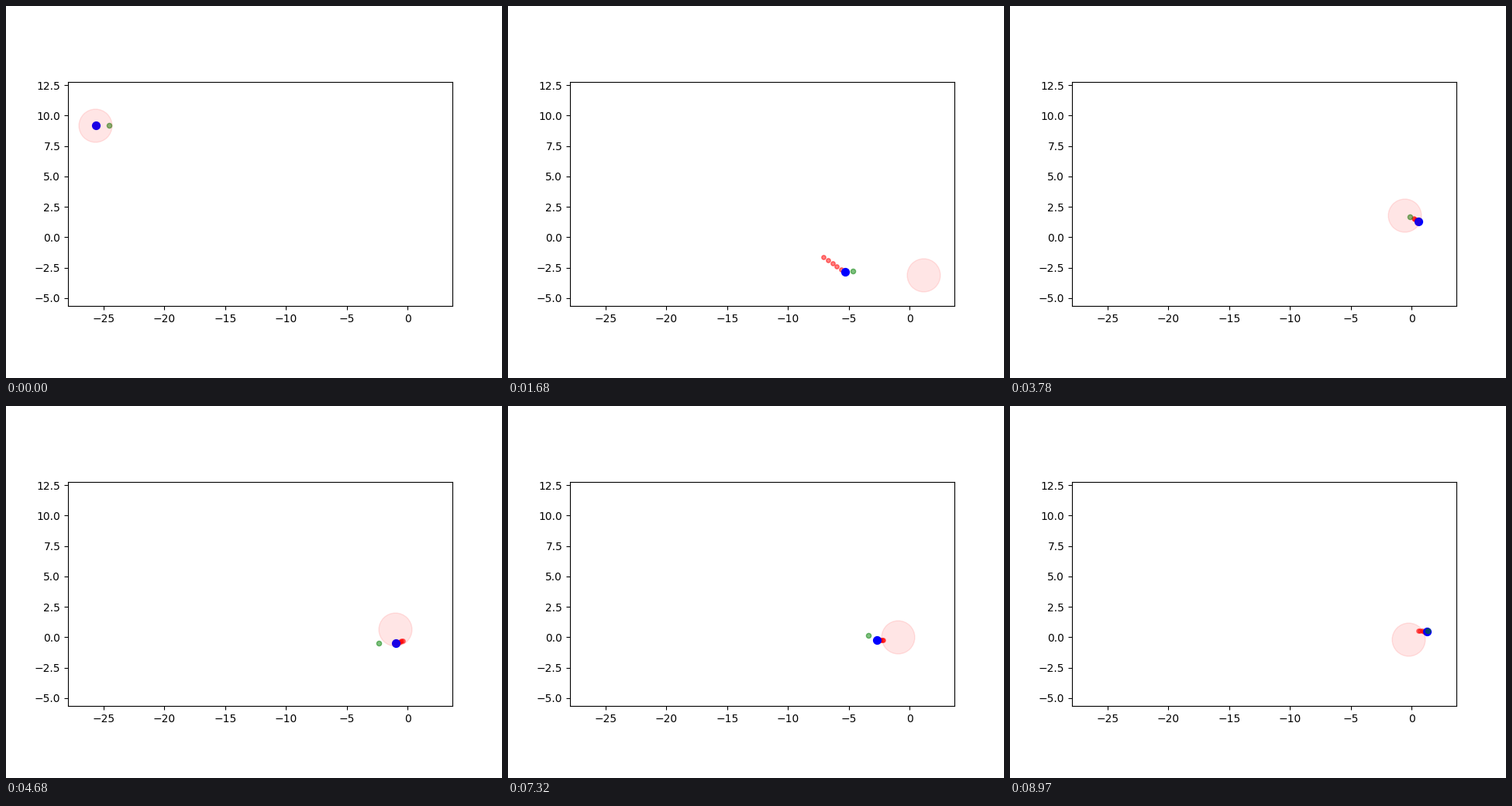
A matplotlib script that plays this animation: 640x480 px, repeating every 9 s.

```python
import numpy as np
import matplotlib.pyplot as plt
from matplotlib.animation import FuncAnimation

FRAMES, STEP = 300, 30
TAIL = 5

# ms, zone x y, agent x y, lead offset x y
POSES = np.array([
    (0, -25.67, 9.17, -25.63, 9.20, 1.08, 0),
    (800, -5.62, 0.85, -16.58, 8.05, 0.89, -0.25),
    (1500, 1.01, -3.93, -7.45, -1.35, 0.64, -0.10),
    (1680, 1.15, -3.10, -5.29, -2.85, 0.61, 0.06),
    (2850, -0.24, 0.18, -2.93, 0.88, 0.45, 0.70),
    (4680, -1.06, 0.63, -0.95, -0.46, -1.40, 0),
    (6000, 0.15, 0.50, -1.80, -0.46, 0.76, 0.25),
    (7320, -0.94, 0.05, -2.66, -0.23, -0.70, 0.38),
    (8970, -0.24, -0.20, 1.28, 0.44, 0.03, 0.08)])

# Roaming around the centre, per column: size, period, time of a peak
SWAY_SIZE = np.array([1.5, 1.2, 1.5, 0.5, 0, 0])
SWAY_PERIOD = np.array([2250, 1700, 2640, 2640, 1, 1])
SWAY_PEAK = np.array([3250, 2400, 4020, 3450, 0, 0])


def sway(t):
    t = t[:, None]
    grow = np.clip((t - 1680) / 1000, 0, 1)
    return grow * SWAY_SIZE * np.cos(2 * np.pi * (t - SWAY_PEAK) / SWAY_PERIOD)


def glide(t, p, now):
    """Smooth Hermite curve through points p at times t."""
    m = np.gradient(p, t, axis=0)
    i = np.clip(np.searchsorted(t, now, side="right") - 1, 0, len(t) - 2)
    h = (t[i + 1] - t[i])[:, None]
    u = (now - t[i])[:, None] / h
    ease = u * u * (3 - 2 * u)
    return (p[i] + ease * (p[i + 1] - p[i])
            + u * (1 - u) * h * ((1 - u) * m[i] - u * m[i + 1]))


now = np.arange(FRAMES) * STEP
times = POSES[:, 0]
# The poses are met exactly, the sway fills the time between them
path = glide(times, POSES[:, 1:] - sway(times), now) + sway(now)
zone, agent, offset = path[:, :2], path[:, 2:4], path[:, 4:]
lead = agent + offset

fig, ax = plt.subplots(figsize=(6.4, 4.8), dpi=100)
ax.set_aspect("equal")
ax.set_xlim(-27.929, 3.684)
ax.set_ylim(-5.644, 12.776)


def dots(size, color, alpha, z):
    return ax.scatter([], [], s=size, color=color, alpha=alpha, zorder=z)


tail_dots = dots(15, "red", 0.5, 1.1)
agent_dot = dots(50, "blue", 1, 1.2)
lead_dot = dots(20, "green", 0.5, 1.3)
zone_dot = dots(950, "red", 0.1, 1.4)


def update(n):
    tail_dots.set_offsets(agent[max(n - TAIL, 0):n + 1])
    agent_dot.set_offsets(agent[[n]])
    lead_dot.set_offsets(lead[[n]])
    zone_dot.set_offsets(zone[[n]])
    return tail_dots, agent_dot, lead_dot, zone_dot


anim = FuncAnimation(fig, update, frames=FRAMES, interval=STEP,
                     repeat=True, repeat_delay=0, blit=False)
plt.show()
```
